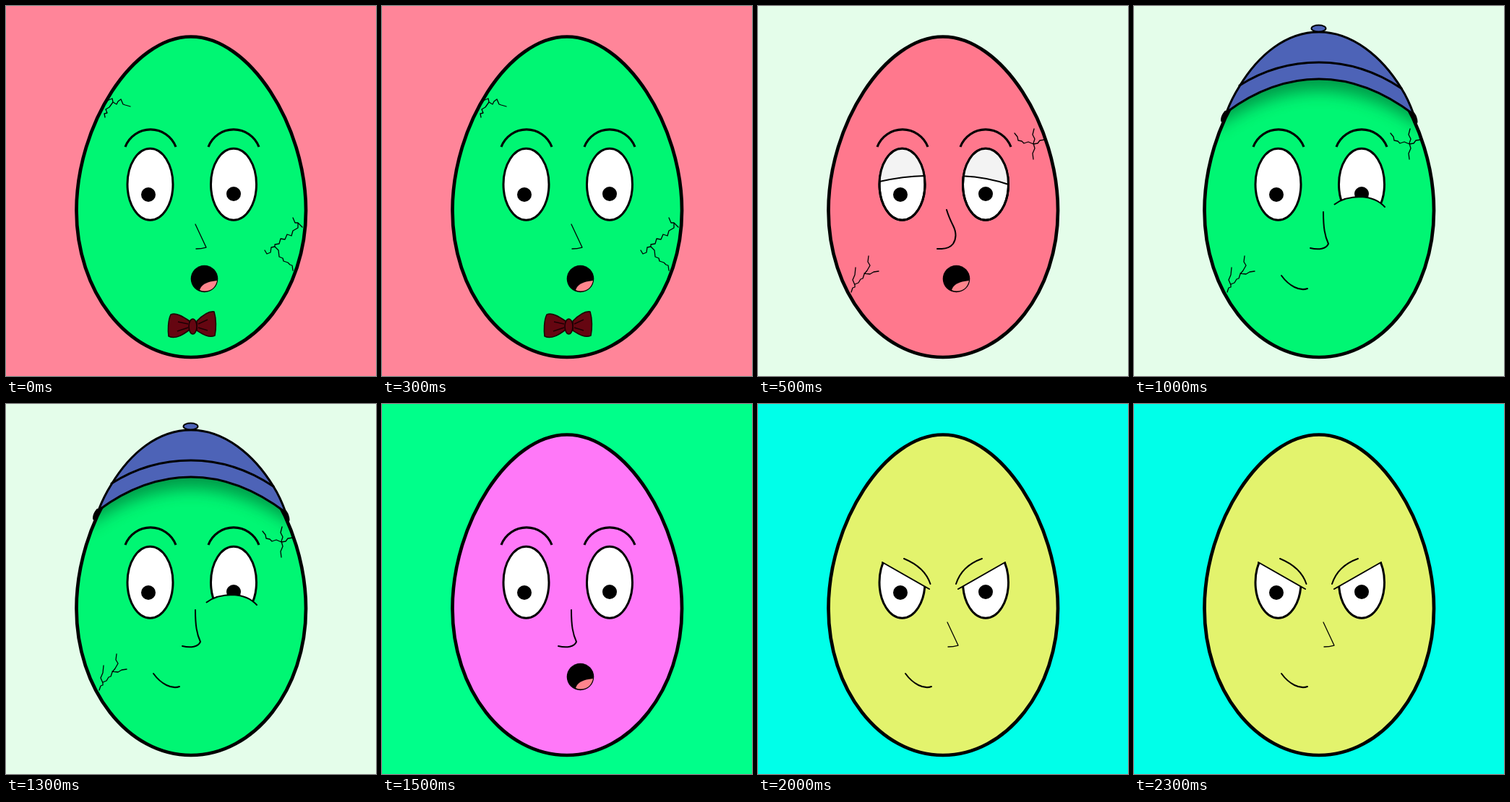
Write an HTML page that moves like this. It is 512 px wide and 512 px high and loops after 2.5 s.

```html
<!DOCTYPE html>
<html lang="en">
<head>
<meta charset="utf-8">
<title>Egg faces</title>
<style>
  html, body { margin: 0; width: 100%; height: 100%; overflow: hidden; }
  svg { display: block; width: 100vw; height: 100vh; }
  .scene { visibility: hidden; animation: show 2.5s step-end infinite; animation-delay: calc(var(--i) * .5s - 2.5s); }
  @keyframes show {
    0% { visibility: visible; }
    20%, 100% { visibility: hidden; }
  }
  .shell { stroke: #000; stroke-width: 4.7; }
  .line { fill: none; stroke: #000; stroke-width: 2; stroke-linecap: round; stroke-linejoin: round; }
  .thin { stroke-width: 1.3; }
  .brow { stroke-width: 3.2; stroke-linecap: butt; }
  .eye { fill: #fff; stroke: #000; stroke-width: 3; }
  .lid { fill: #f3f3f3; }
  .hat { fill: #4d63b7; stroke: #000; stroke-width: 3; stroke-linejoin: round; }
  .bow { fill: #650611; stroke: #1c0003; stroke-width: 1.6; stroke-linejoin: round; }
</style>
</head>
<body>
<svg viewBox="0 0 512 512">
  <defs>
    <path id="egg" d="M256 42.500C337 42.500 415 165 415 283C415 395 344 486 256 486S97.500 395 97.500 283C97.500 165 175 42.500 256 42.500Z"/>
    <ellipse id="left" cx="199.500" cy="246.800" rx="31.500" ry="49.500"/>
    <ellipse id="right" cx="315" cy="246.800" rx="31.500" ry="49.500"/>
    <circle id="pupilL" cx="197" cy="261" r="10"/>
    <circle id="pupilR" cx="315" cy="260" r="10"/>

    <clipPath id="inEgg"><use href="#egg"/></clipPath>
    <clipPath id="inLeft"><use href="#left"/></clipPath>
    <clipPath id="inRight"><use href="#right"/></clipPath>
    <clipPath id="aboveWink"><path d="M270 180H360V290L347 278Q335 264 314 264Q291 264 277.500 274.500Z"/></clipPath>
    <clipPath id="glare"><path d="M160 212L172 219L237 256V310H160ZM354 212L342 219L277 256V310H354Z"/></clipPath>
    <filter id="soft" x="-20%" y="-40%" width="140%" height="180%"><feGaussianBlur stdDeviation="11"/></filter>

    <path id="brows" class="line brow" d="M165 195A37.500 37.500 0 0 1 235 195M280 195A37.500 37.500 0 0 1 350 195"/>
    <g id="eyes">
      <use href="#left" class="eye"/><use href="#right" class="eye"/>
      <use href="#pupilL"/><use href="#pupilR"/>
    </g>
    <g id="mouth">
      <circle cx="274.500" cy="377.500" r="18.800"/>
      <path d="M268 393Q271 382 292 380Q289 394 275 394.500Q271 394.500 268 393Z" fill="#ff858d"/>
    </g>
    <path id="smile" class="line" d="M204 373Q212 384 222 389Q232 394 240 391"/>
    <path id="noseSharp" class="line thin" d="M262 302L277 334Q270 336 263 336"/>
    <path id="noseLong" class="line" d="M262 285C262 307 264 318 269 329C266 336 256 338 244 335"/>
    <g id="cracks" class="line thin">
      <path d="M382 170L380 178L383 184L381 190L383 197L380 204L381 212M355 176L359 181L360 186L365 187L368 190L374 188L381 191L387 190L390 186L397 185"/>
      <path d="M129 396L131 390L134 389L134 385L139 383L142 378L145 377L147 371L151 366L155 359L152 354L153 346M134 386L131 379L134 372L135 362M147 370L155 371L160 368L167 367"/>
    </g>
  </defs>

  <g class="scene" style="--i:0">
    <rect width="512" height="512" fill="#ff8599"/>
    <use href="#egg" class="shell" fill="#00f673"/>
    <g class="line thin">
      <path d="M137 135L140 131L147 128L148 133L153 136L155 132L159 129L162 136L165 137L172 139M148 133L143 140L138 143L140 148L136 149L137 154"/>
      <path d="M397 293L400 300L404 300L410 306M404 301L404 307L397 311L395 318L389 316L386 323L380 322L378 329L372 330V333L367 334L366 341L361 343L358 338M372 333L377 338L378 347L383 349L384 353L390 355L393 358L396 359L397 366"/>
    </g>
    <use href="#brows"/><use href="#eyes"/><use href="#noseSharp"/><use href="#mouth"/>
    <g class="bow">
      <path d="M254 436C244 429 235 424 228 427C224 435 224 449 225 457C235 462 246 454 254 448Z"/>
      <path d="M264 436C272 428 281 422 288 423C291 433 291 447 289 456C281 460 272 454 264 449Z"/>
      <path d="M252 440L238 437M252 445L237 450M266 440L279 434M266 445L279 449" fill="none"/>
      <ellipse cx="258.500" cy="443.500" rx="5.500" ry="10.500"/>
    </g>
  </g>

  <g class="scene" style="--i:1">
    <rect width="512" height="512" fill="#e4fdea"/>
    <use href="#egg" class="shell" fill="#ff788d"/>
    <use href="#cracks"/><use href="#brows"/><use href="#eyes"/>
    <g class="line">
      <path class="lid" clip-path="url(#inLeft)" d="M160 190V245Q200 235 236 235V190Z"/>
      <path class="lid" clip-path="url(#inRight)" d="M278 190V235Q318 236 352 249V190Z"/>
    </g>
    <use href="#left" class="eye" style="fill:none"/><use href="#right" class="eye" style="fill:none"/>
    <path class="line" d="M261 282Q264 292 270 304Q277 318 270 329Q264 337 248 336"/>
    <use href="#mouth"/>
  </g>

  <g class="scene" style="--i:2">
    <rect width="512" height="512" fill="#e4fdea"/>
    <use href="#egg" fill="#00f673"/>
    <g clip-path="url(#inEgg)">
      <path d="M110 170Q184 117 256 117T402 170V130Q330 70 256 70T110 130Z" fill="#007a3a" opacity=".75" filter="url(#soft)"/>
    </g>
    <use href="#egg" class="shell" fill="none"/>
    <use href="#cracks"/>
    <path class="line" style="stroke-width:6" d="M127 148Q123 153 123 158M386 150Q389 154 389.500 160"/>
    <path class="hat" d="M128 147C133 134 139 122 146 111C172 68 210 36 256 36S343 70 370 114C377 125 382 136 387 150Q322 101 256 101T128 147Z"/>
    <path class="line" style="stroke-width:3" d="M146 110Q196 78 256 78T370 114"/>
    <ellipse class="hat" style="stroke-width:2" cx="255.500" cy="31" rx="10" ry="4.500"/>
    <use href="#brows"/>
    <use href="#left" class="eye"/><use href="#pupilL"/>
    <g clip-path="url(#aboveWink)"><use href="#right" class="eye"/><use href="#pupilR"/></g>
    <path class="line" d="M277.500 274.500Q291 264 314 264Q335 265 347 278"/>
    <use href="#noseLong"/><use href="#smile"/>
  </g>

  <g class="scene" style="--i:3">
    <rect width="512" height="512" fill="#00ff8a"/>
    <use href="#egg" class="shell" fill="#ff78f8"/>
    <use href="#brows"/><use href="#eyes"/><use href="#noseLong"/><use href="#mouth"/>
  </g>

  <g class="scene" style="--i:4">
    <rect width="512" height="512" fill="#00ffe9"/>
    <use href="#egg" class="shell" fill="#e3f36d"/>
    <g clip-path="url(#glare)"><use href="#eyes"/></g>
    <path class="line" d="M172 219L237 256M342 219L277 256M202 214Q231 226 238.500 249M310 214Q282 224 274 249"/>
    <use href="#noseSharp"/><use href="#smile"/>
  </g>
</svg>
</body>
</html>
```
